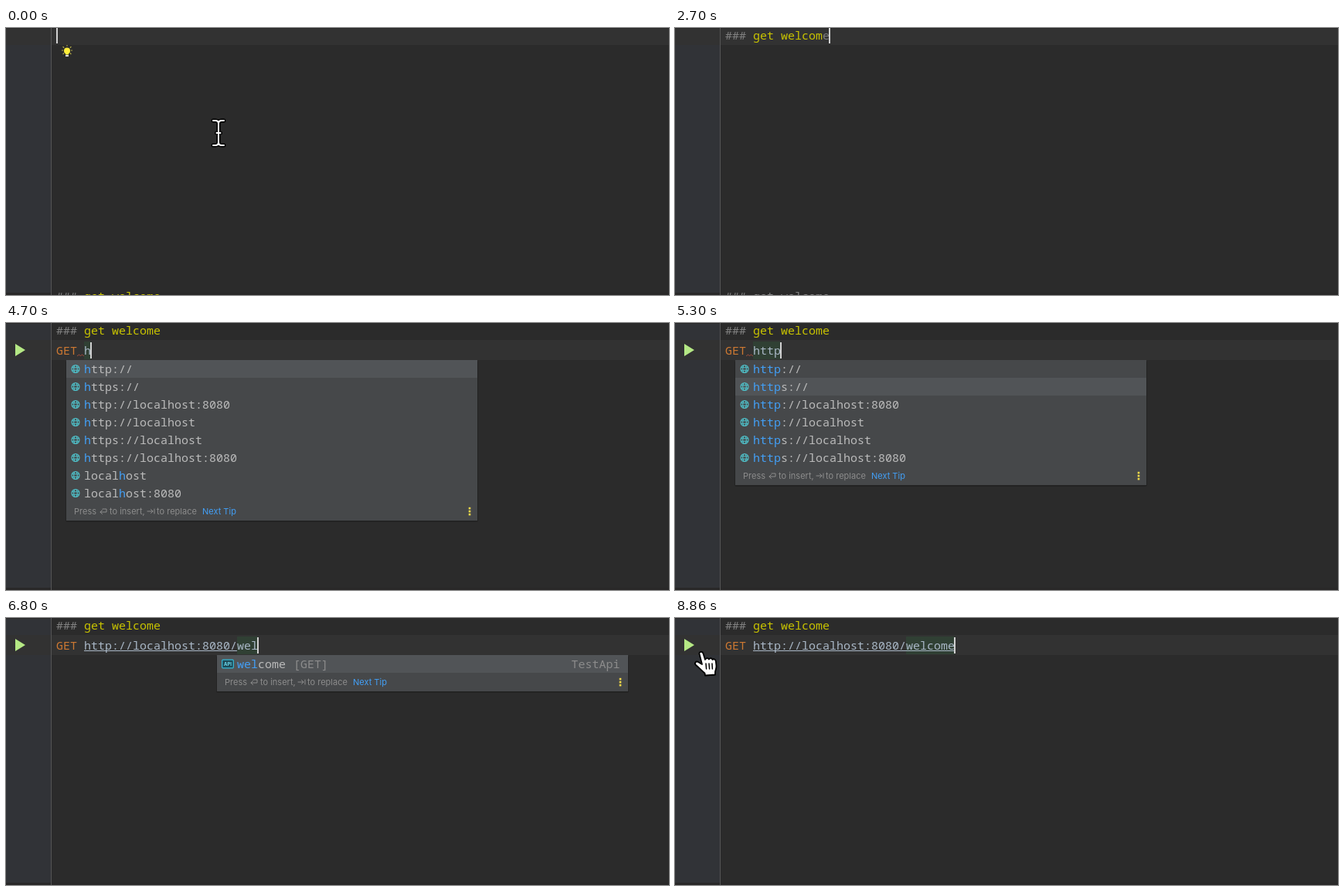
An HTML page for the animation above (9.03 s loop, 858 px wide and 346 px high).

```html
<!DOCTYPE html>
<html lang="en">
<head>
<meta charset="utf-8">
<title>Typing an HTTP request</title>
<style>
  html, body { margin: 0; width: 100%; height: 100%; overflow: hidden; background: #2b2b2b; }
  svg { display: block; width: 858px; height: 346px; }
  text { white-space: pre; }
  .code { font: 15px "Noto Sans Mono", "DejaVu Sans Mono", monospace; }
  .bold { font-weight: 700; }
  .tip { font: 11px Inter, "Open Sans", sans-serif; }
</style>
</head>
<body>
<svg id="stage" viewBox="0 0 858 346"></svg>
<script>
const LOOP = 9030;
const LEFT = 65, CHAR = 9, ROW = 23;
const TITLE = "### get welcome";
const URL_TEXT = "http://localhost:8080";
const HOSTS = ["http://", "https://", "http://localhost:8080", "http://localhost",
  "https://localhost", "https://localhost:8080", "localhost", "localhost:8080"];
const C = {
  grey: "#808080", yellow: "#c9c400", plain: "#a9b7c6", orange: "#cc7832",
  match: "#439ff5", item: "#bbbbbb", dim: "#8c8c8c", green: "#304034"
};

// Step tables: [start in ms, value]
const typed = [[0, 0], [200, 1], [300, 2], [600, 3], [900, 4], [1000, 5], [1400, 6], [1500, 7],
  [1600, 8], [1700, 9], [1800, 10], [2200, 11], [2300, 13], [2400, 14], [2700, 15]];
const lit = [[0, 4], [1100, 5], [1500, 6], [1600, 7], [1700, 8], [1800, 9], [2000, 10],
  [2300, 11], [2400, 13], [2700, 14], [2900, 15]];
const request = [[0, ""], [3600, "G"], [4000, "Ge"], [4200, "GET "], [4700, "GET h"],
  [4900, "GET ht"], [5000, "GET htt"], [5100, "GET http"], [5600, "GET " + URL_TEXT],
  ...[[6000, 1], [6200, 2], [6400, 3], [6500, 4], [6900, 5], [7000, 6], [7200, 7], [7400, 8]]
    .map(([ms, n]) => [ms, "GET " + URL_TEXT + "/welcome".slice(0, n)])];
const marked = [[0, null], [3600, 0], [4200, null], [4700, 4], [5600, 11], [5700, null], [6200, 26]];
const picked = [[0, 0], [5300, 1], [5400, 2]];

const at = (table, t) => table.reduce((v, [ms, next]) => t >= ms ? next : v, table[0][1]);
const col = n => LEFT + CHAR * n;

const rect = (x, y, w, h, fill, more = "") =>
  `<rect x="${x}" y="${y}" width="${w}" height="${h}" fill="${fill}" ${more}/>`;
const path = (d, stroke, width = 1, fill = "none") =>
  `<path d="${d}" stroke="${stroke}" stroke-width="${width}" fill="${fill}" stroke-linecap="round" stroke-linejoin="round"/>`;
const text = (x, y, s, fill, cls = "code") =>
  s ? `<text x="${x}" y="${y}" fill="${fill}" class="${cls}">${s}</text>` : "";
const move = (x, y, s) => `<g transform="translate(${x} ${y})">${s}</g>`;

function bulb() {
  const rays = path("M-6.5 -1h1M5.5 -1h1M-5 -5.5l.8 .8M5 -5.5l-.8 .8M0 -7.5v.6M-5 3.5l.8-.7M5 3.5l-.8-.7", "#b9b04a", 1.2);
  return move(79, 30, rays + `<circle cy="-.5" r="4" fill="#ffee3a"/>` +
    rect(-2, 2, 4, 2.5, "#ffee3a") + rect(-2, 5, 4, 2, "#d8d8d8"));
}

function globe(x, y) {
  return move(x, y, path("M-5 0a5 5 0 1 0 10 0a5 5 0 1 0-10 0M-2.3 0a2.3 5 0 1 0 4.6 0a2.3 5 0 1 0-4.6 0M-4.5-1.8h9M-4.5 1.8h9", "#4fc3cc", 1.1));
}

function ibeam(x, y) {
  const d = "M-7-16H-4Q0-16 0-12Q0-16 4-16H7M0-12V12M-7 16H-4Q0 16 0 12Q0 16 4 16H7M-2.5 0H2.5";
  return move(x, y, path(d, "#000", 5) + path(d, "#fff", 2));
}

function hand(x, y) {
  const d = "M-1.5 1.5C-2-1.5 2.5-2.5 3.5 1L6 9C7 6.5 10 6.5 11 8.5C12.5 6.5 15 7 15.5 9" +
    "C17 7.5 19.5 8.5 19.8 11L20.5 17C20.8 21 19 23 19 25L19 28.5L6 29.5L5.5 26.5" +
    "C2 24-2 19-6 16C-8.5 13.5-6 10.5-3 12L2 15Z";
  return move(x, y, path(d, "#000", 1.8, "#fff") + path("M7 14l.6 7M11 14l.6 7M15 14l.4 7", "#000", 1.5));
}

function popup(x, rows, body, tip) {
  const h = rows * ROW + 24, base = 48 + rows * ROW + 16;
  const dots = [-4, 0, 4].map(d => rect(x + 520.7, base - 5.2 + d, 2.6, 2.6, "#f0d848")).join("");
  return rect(x - 1, 49, 534, h + 1, "#000", 'opacity=".18" rx="2"') +
    rect(x, 48, 532, h, "#46484a") + body + tip(x + 10, base) + dots;
}

const chosenRow = (x, i) => rect(x, 48 + i * ROW, 532, ROW, "#515457");

function dotTip(x, y) {
  return text(x, y, "Press", C.dim, "tip") + path(`M${x + 33} ${y - 4}l3.5-4l3.5 4`, C.dim, 1.1) +
    text(x + 43, y, ". to choose the selected (or first) suggestion and insert a dot afterwards", C.dim, "tip") +
    text(x + 423, y, "Next Tip", C.match, "tip");
}

function insertTip(x, y) {
  return text(x, y, "Press", C.dim, "tip") +
    path(`M${x + 37} ${y - 7}h5v4h-8m2.5-2.5l-2.5 2.5l2.5 2.5`, C.dim) +
    text(x + 46, y, "to insert,", C.dim, "tip") +
    path(`M${x + 95} ${y - 4}h7m-2.5-2.5l2.5 2.5l-2.5 2.5M${x + 104} ${y - 7}v6`, C.dim) +
    text(x + 107, y, "to replace", C.dim, "tip") + text(x + 166, y, "Next Tip", C.match, "tip");
}

function methodPopup(n) {
  return popup(60, 1, chosenRow(60, 0) + text(LEFT, 65, "GET".slice(0, n), C.match, "code bold") +
    text(col(n), 65, "GET".slice(n), C.item, "code bold"), dotTip);
}

function hostPopup(prefix, sel) {
  const list = HOSTS.filter(s => s.includes(prefix));
  const body = list.map((s, i) => {
    const y = 65 + i * ROW, k = s.indexOf(prefix), end = k + prefix.length;
    return globe(90, y - 5.5) + text(col(4), y, s.slice(0, k), C.item) +
      text(col(4 + k), y, prefix, C.match) + text(col(4 + end), y, s.slice(end), C.item);
  }).join("");
  return popup(78, list.length, chosenRow(78, sel) + body, insertTip);
}

function pathPopup(n) {
  const icon = rect(279.7, 54.2, 14.6, 10.6, "#1d4a57", 'stroke="#35b8d6" stroke-width="1.2" rx="1"') +
    '<text x="282" y="61.8" fill="#6fdcf0" style="font:700 6px Inter,sans-serif">API</text>';
  return popup(273, 1, chosenRow(273, 0) + icon + text(col(26), 65, "welcome".slice(0, n), C.match) +
    text(col(26 + n), 65, "welcome".slice(n), C.item) + text(372, 65, "[GET]", C.dim) +
    text(731.5, 65, "TestApi", C.dim), insertTip);
}

function pointer(t) {
  if (t < 100) return ibeam(275, 136);
  if (t < 7900) return "";
  if (t >= 8860) return hand(33, 45);
  const u = Math.min(1, Math.floor((t - 7900) / 100) / 8);
  const e = u * u * (3 - 2 * u);
  const x = 280 - 246 * e, y = 158 - 112 * e;
  return x > 58 ? ibeam(x, y) : hand(x, y);
}

function titleLine(t) {
  const n = at(typed, t), k = Math.max(4, Math.min(n, at(lit, t)));
  return text(LEFT, 15, TITLE.slice(0, Math.min(n, 4)), C.grey) +
    text(col(4), 15, TITLE.slice(4, k), C.yellow) + text(col(k), 15, TITLE.slice(k, n), C.grey);
}

function requestLine(t, line) {
  const mark = at(marked, t), ready = t >= 4500;
  let s = mark === null ? "" : rect(col(mark), 24, (line.length - mark) * CHAR, 23, C.green);
  s += text(LEFT, 41, line.slice(0, 4), ready ? C.orange : C.plain) + text(col(4), 41, line.slice(4), C.plain);
  if (ready) s += `<path d="M12 27V43L25 35Z" fill="#b5e884"/>`;
  if (ready && t < 5700) s += path("M92.5 42.5l2-1.5l2 1.5l2-1.5l2 1.5", "#a8503c");
  if (t >= 5700) {
    const end = t >= 7700 ? line.length : Math.min(line.length, 26);
    s += rect(col(4), 42, (end - 4) * CHAR, 1, C.plain);
  }
  return s;
}

function scene(t) {
  const second = t >= 3200, line = at(request, t);
  const [rowY, rowH] = second ? [22, 26] : [0, 22];
  let s = rect(0, 0, 858, 346, "#2b2b2b") + rect(0, 0, 58, 346, "#313337") +
    rect(0, rowY, 858, rowH, "#323232") + rect(0, 0, 858, 1, "#282828") +
    rect(0, 343, 858, 3, "#292828") + rect(58, 0, 1, 346, "#555555");

  s += titleLine(t) + requestLine(t, line);
  if (!second) {
    const done = t >= 700;
    s += text(LEFT, 352.5, "###", C.grey) + text(col(4), 352.5, "get welcome", done ? C.grey : C.yellow);
  }
  if (t < 200) s += bulb();

  const n = second ? line.length : at(typed, t);
  const shown = t < 7600 || t >= 7700;
  if (shown) s += rect(col(n) - (n ? 1 : 0), second ? 25 : 0, 2, second ? 21 : 20, "#d0d0d0");

  if (t >= 3800 && t < 4200) s += methodPopup(t < 4100 ? 1 : 2);
  if (t >= 4700 && t < 5600) s += hostPopup(line.slice(4), at(picked, t));
  if (t >= 6700 && t < 7700) s += pathPopup(line.length - 26);
  return s + pointer(t);
}

const stage = document.getElementById("stage");
const start = performance.now();
let last = "";
function tick() {
  const next = scene((performance.now() - start) % LOOP);
  if (next !== last) stage.innerHTML = last = next;
  requestAnimationFrame(tick);
}
tick();
</script>
</body>
</html>
```
